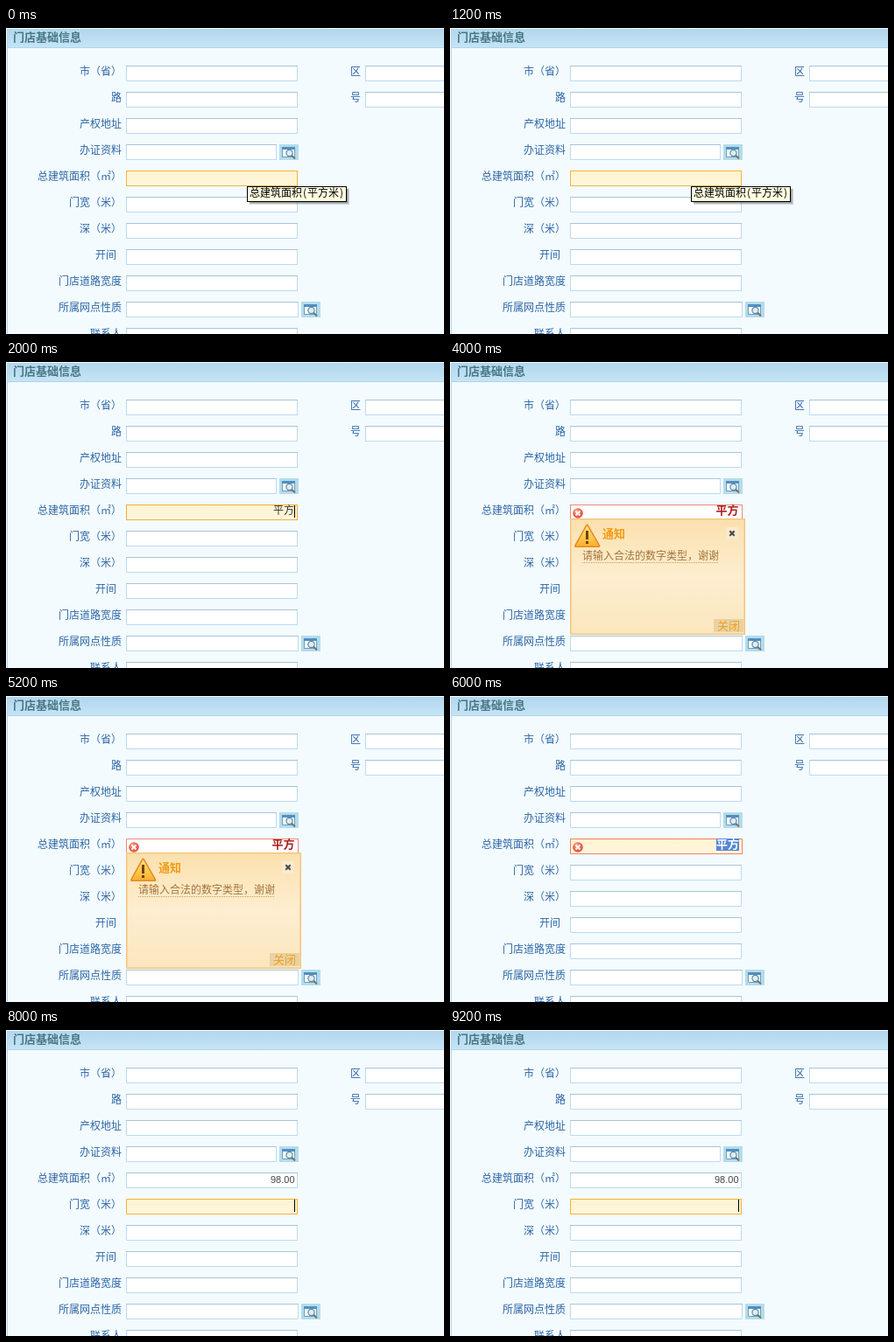
These frames come from a looping animation (500x350 px, 10000 ms). An HTML page with a canvas:

```html
<!DOCTYPE html>
<html lang="zh-CN">
<head>
<meta charset="utf-8">
<title>表单校验</title>
<style>
html, body { margin: 0; width: 100%; height: 100%; overflow: hidden; background: #f3fbff; }
canvas { display: block; }
</style>
</head>
<body>
<canvas id="stage" width="500" height="350"></canvas>
<script>
const ctx = document.getElementById('stage').getContext('2d');
const CJK = '"Noto Sans CJK SC", "Noto Sans CJK", sans-serif';
const LOOP = 10000, STEP = 2000;
const AREA = 163, DOOR = 193;
const LABELS = ['市（省）', '路', '产权地址', '办证资料', '总建筑面积（㎡）',
  '门宽（米）', '深（米）', '开间', '门店道路宽度', '所属网点性质', '联系人'];

function rect(x, y, w, h, color) {
  ctx.fillStyle = color;
  ctx.fillRect(x, y, w, h);
}

function frame(x, y, w, h, color) {
  ctx.strokeStyle = color;
  ctx.lineWidth = 1;
  ctx.strokeRect(x + 0.5, y + 0.5, w - 1, h - 1);
}

function text(str, x, y, color, font = '12px ' + CJK, align = 'left') {
  ctx.font = font;
  ctx.textAlign = align;
  ctx.fillStyle = color;
  ctx.fillText(str, x, y);
}

function bold(str, x, y, color) {
  text(str, x, y, color, 'bold 13px ' + CJK);
}

function gradient(y0, y1, ...colors) {
  const g = ctx.createLinearGradient(0, y0, 0, y1);
  colors.forEach((c, i) => g.addColorStop(i / (colors.length - 1), c));
  return g;
}

function line(points, color, width) {
  ctx.beginPath();
  points.forEach(([x, y]) => ctx.lineTo(x, y));
  ctx.strokeStyle = color;
  ctx.lineWidth = width;
  ctx.stroke();
}

function cross(x, y, r, color, width) {
  line([[x - r, y - r], [x + r, y + r]], color, width);
  line([[x + r, y - r], [x - r, y + r]], color, width);
}

function field(x, y, w) {
  rect(x, y, w, 18, '#fff');
  frame(x, y, w, 18, '#bcdaf2');
  rect(x, y, w, 1, '#a9c5da');
}

function activeField(y, border, w = 196) {
  rect(137, y, w, 18, gradient(y, y + 18, '#fff3cf', '#fff8df'));
  frame(137, y, w, 18, border);
}

function caret(y) {
  rect(329, y, 1, 14, '#000');
}

function lookup(x, y) {
  rect(x, y, 22, 18, '#b4dcea');
  rect(x + 3, y + 3, 15, 12, '#f4fbff');
  frame(x + 3, y + 3, 15, 12, '#6a9fc4');
  rect(x + 3, y + 3, 15, 3, '#4f8fc3');
  ctx.beginPath();
  ctx.arc(x + 11.5, y + 10, 3.6, 0, Math.PI * 2);
  ctx.fillStyle = '#d9effa';
  ctx.fill();
  ctx.strokeStyle = '#6d8593';
  ctx.lineWidth = 1.2;
  ctx.stroke();
  line([[x + 14, y + 12.5], [x + 18, y + 16.5]], '#71736f', 2);
}

function errorIcon() {
  const g = ctx.createRadialGradient(144, 170, 1, 146, 173, 6);
  g.addColorStop(0, '#f9a08a');
  g.addColorStop(1, '#df4a31');
  ctx.beginPath();
  ctx.arc(146, 173, 5.8, 0, Math.PI * 2);
  ctx.fillStyle = g;
  ctx.fill();
  cross(146, 173, 2.5, '#fff', 1.8);
}

function form() {
  rect(0, 0, 500, 350, '#f3fbff');
  rect(1, 1, 499, 22, gradient(1, 23, '#b2d6ed', '#c6e5f6'));
  rect(1, 22, 499, 1, '#b0d6ec');
  rect(1, 1, 1, 349, '#b2d6ea');
  bold('门店基础信息', 8, 15, '#477783');

  LABELS.forEach((label, i) => {
    const right = label === '开间' ? 126 : 132;
    text(label, right, 54 + 30 * i, '#2d66a5', undefined, 'right');
    field(137, 43 + 30 * i, i === 3 ? 172 : i === 9 ? 197 : 196);
  });
  ['区', '号'].forEach((label, i) => {
    text(label, 405, 54 + 30 * i, '#2d66a5', undefined, 'right');
    field(410, 43 + 30 * i, 95);
  });
  lookup(312, 133);
  lookup(337, 313);
}

function tooltip() {
  for (let i = 0; i < 3; i++) rect(278, 184, 114 - i, 18 - i, 'rgba(0,0,0,.15)');
  rect(275, 181, 114, 18, '#ffffe1');
  frame(275, 181, 114, 18, '#000');
  text('总建筑面积', 278, 193, '#000');
  text('(', 339, 193, '#000');
  text('平方米', 344, 193, '#000');
  text(')', 381, 193, '#000');
}

function warning() {
  ctx.beginPath();
  ctx.moveTo(156.5, 187);
  ctx.lineTo(170, 210.5);
  ctx.lineTo(143.5, 210.5);
  ctx.closePath();
  ctx.lineJoin = 'round';
  ctx.lineWidth = 3;
  ctx.strokeStyle = '#e58a22';
  ctx.stroke();
  ctx.fillStyle = gradient(187, 211, '#ffe47c', '#fbb02e');
  ctx.fill();
  line([[156.5, 193], [156.5, 203]], '#76400d', 3);
  rect(155, 205, 3, 3, '#76400d');
}

function notice() {
  rect(137, 179, 200, 133, gradient(179, 312, '#fbe0ad', '#fdeed0', '#fbe6bd'));
  frame(137, 179, 200, 133, '#f5c27a');
  frame(138, 180, 198, 131, '#fad69b');
  warning();
  bold('通知', 174, 201, '#f29a12');
  rect(315, 189, 14, 14, '#f8ead0');
  cross(322, 196, 2.7, '#494949', 2);
  text('请输入合法的数字类型，谢谢', 151, 226, '#a4743c');
  for (let x = 151; x < 307; x += 2) rect(x, 229, 1, 1, '#c99c60');
  rect(301, 294, 34, 15, '#e9d2a3');
  text('关闭', 305, 306, '#f0a01e', '13px ' + CJK);
}

const scenes = [
  () => {
    activeField(AREA, '#f8b13f');
    tooltip();
  },
  () => {
    activeField(AREA, '#f8ae35');
    text('平方', 305, 174, '#333');
    caret(164);
  },
  () => {
    rect(137, AREA, 197, 18, '#fff');
    frame(137, AREA, 197, 18, '#ee8b77');
    errorIcon();
    bold('平方', 303.5, 174, '#b01c1c');
    notice();
  },
  () => {
    activeField(AREA, '#f0805f', 197);
    errorIcon();
    rect(304, 163, 26, 14, '#5686d7');
    bold('平方', 304, 174, '#fff');
  },
  () => {
    text('98.00', 329.5, 175, '#444', '11px "Liberation Sans", Arial, sans-serif', 'right');
    activeField(DOOR, '#f8ae35');
    caret(194);
  }
];

function draw(now) {
  form();
  scenes[Math.floor((now % LOOP) / STEP)]();
}

const start = performance.now();
function tick() {
  draw(performance.now() - start);
  requestAnimationFrame(tick);
}
tick();
</script>
</body>
</html>
```
